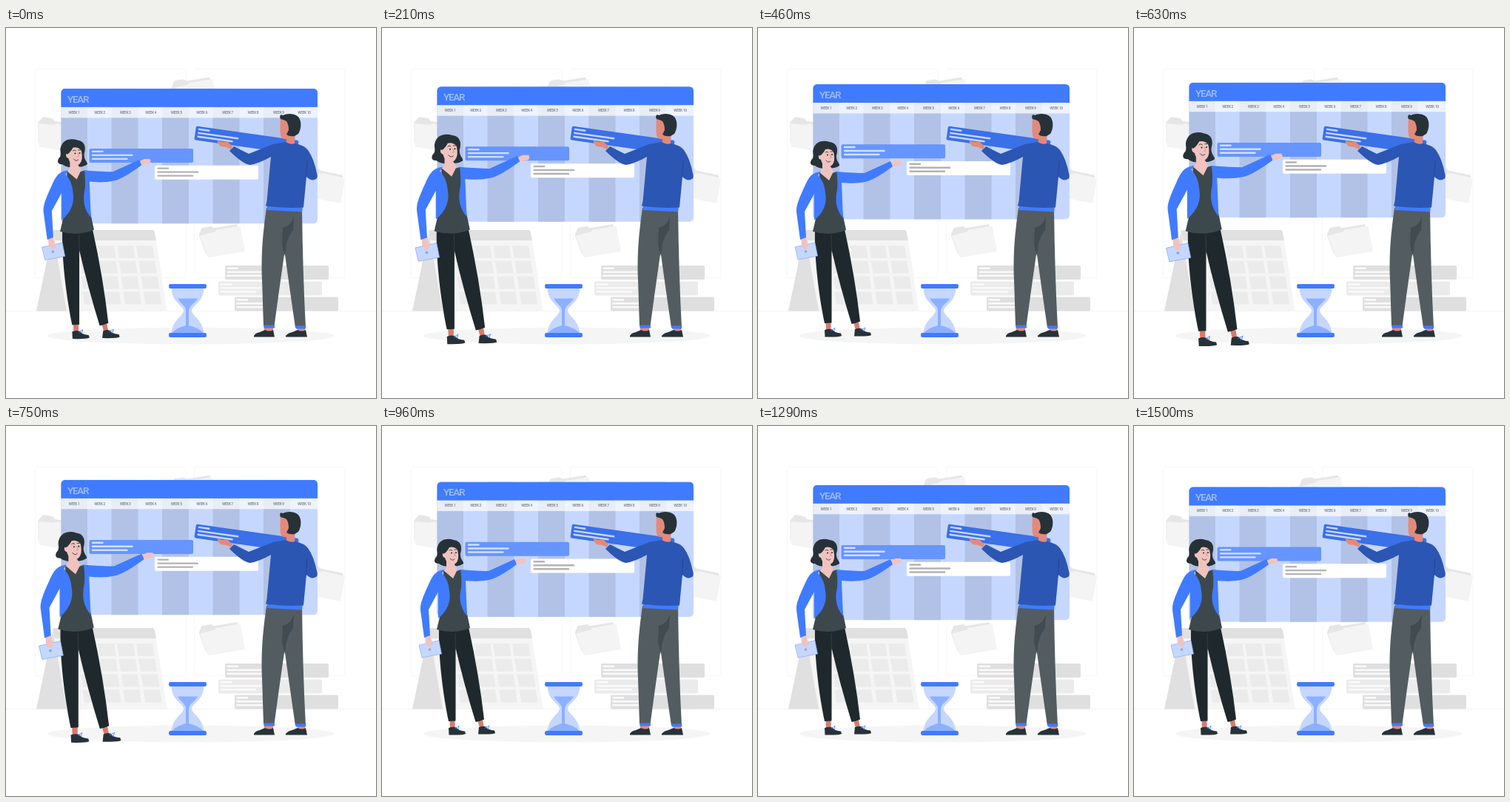
An HTML page that plays this animation: 500x500 px, repeating every 1.54 s.

```html
<!DOCTYPE html>
<html lang="en">
<head>
<meta charset="utf-8">
<title>Yearly planner</title>
<style>
html, body { margin: 0; width: 100%; height: 100%; overflow: hidden; background: #fff; }
svg { display: block; width: 100vw; height: 100vh; }
text { font-family: Roboto, "Liberation Sans", sans-serif; }
.line { fill: none; stroke-linecap: round; stroke-linejoin: round; }
.blue { fill: #407bff; }
.pale { fill: #c6d7ff; }
.dark { fill: #263238; }
.skin { fill: #f0c3bf; }
.tan { fill: #e4897b; }
</style>
</head>
<body>
<svg viewBox="0 0 500 500">
  <defs>
    <g id="folder">
      <path fill="#e6e6e6" d="M0 10 4 3Q5 1 7 1H18L22 4H52Q54 4 54 7V36H5Z"/>
      <path fill="#f4f4f4" d="M1 11 22 9 25 7H55Q57 7 57 9L58 40Q58 42 56 42H9Q7 42 6.500 40Z"/>
    </g>
    <path id="lines" class="line" stroke-width="2.4" d="M4.5 3.8H18M4.5 8.8H58M4.5 13.8H51"/>
    <clipPath id="boardShape"><rect x="74.5" width="346.5" height="182.5" rx="5.5"/></clipPath>
  </defs>

  <g class="line" stroke="#f7f7f7">
    <rect x="39.5" y="55.5" width="203.5" height="282" rx="2"/>
    <rect x="254.5" y="55.5" width="203.5" height="282" rx="2"/>
    <path stroke="#f3f3f3" d="M0 382.5H500"/>
  </g>
  <ellipse cx="249.5" cy="416" rx="194" ry="11.5" fill="#f5f5f5"/>
  <use href="#folder" transform="translate(222 71) rotate(-9)"/>
  <use href="#folder" transform="translate(45 118) rotate(10)"/>
  <use href="#folder" transform="translate(404 184) rotate(12)"/>
  <use href="#folder" transform="translate(259 270) rotate(-9.5)"/>

  <path fill="#e0e0e0" d="M63 277 41 382.5H90Z"/>
  <path fill="#f5f5f5" d="M64 280H202L217.5 382.5H82Z"/>
  <path fill="#e0e0e0" d="M63 275Q63 273 66 273H198Q200 273 200.500 275L203 287H66Z"/>
  <g id="cells" fill="#ebebeb"></g>
  <g id="books"></g>

  <g id="board">
    <g clip-path="url(#boardShape)">
      <rect class="pale" x="74" width="348" height="183"/>
      <g id="weeks"></g>
      <rect class="blue" x="74" width="348" height="25"/>
      <text x="83" y="18.800" font-size="13.5" font-weight="500" letter-spacing="-1.3" fill="#a0bdff">YEAR</text>
    </g>
    <rect x="112.5" y="81.2" width="140.5" height="19" rx="2" fill="#6695ff"/>
    <use href="#lines" x="112.5" y="81.2" stroke="#d1dfff"/>
    <rect x="201" y="104" width="140" height="19" rx="2" fill="#fff"/>
    <use href="#lines" x="201" y="104" stroke="#b3b3b3"/>
  </g>

  <g id="hourglass">
    <path class="pale" d="M223.5 351H267.5C267 371 252 374 251 382 252 390 266 394 267.5 413H223.5C225 394 239 390 240 382 239 374 224 371 223.5 351Z"/>
    <path fill="#8cb0ff" d="M232 365.5H259C256 372 247.5 375 247 382V402Q260 405 267 412H224Q231 405 243 402V382C243 375 235 372 232 365.5Z"/>
    <path class="blue" d="M222 346H269Q271 346 271 349T269 352H222Q220 352 220 349T222 346ZM222 412H269Q271 412 271 415T269 418H222Q220 418 220 415T222 412Z"/>
  </g>

  <g id="man">
    <g transform="translate(257 132.5) rotate(8)">
      <rect width="140" height="19" rx="2" fill="#3a70e8"/>
      <use href="#lines" stroke="#c5d6fa"/>
    </g>
    <path class="tan" d="M348 404H361V411H350ZM393 405H404V411H395Z"/>
    <path class="dark" d="M335 416Q337 412 343 411L350 408Q356 411 361 408L363 417.5H335ZM378 416Q381 412 387 411L394 408Q400 411 405 408L407 417.5H378Z"/>
    <path fill="#535c61" d="M352 243C346 285 345 310 346 340L348 403H362.500Q371 340 376.500 303 383 350 391 405H405Q401 330 400 243Z"/>
    <path fill="#424b50" d="M389 254Q386 267 374 270L373 293 377 308Q378 285 388 273Z"/>
    <path class="blue" d="M348 401.5H363V405.5H349ZM391 402.5H405.5L405 406.5H392ZM353 239 401 241 400 248.500 352.5 246Z"/>
    <path class="tan" d="M304 164 298 161 290 160 286 155 286 152 293 154 299 153 306 160ZM371 122Q370 140 371 145 372 151 379 150V156Q385 159 390 156L391 140 382 120Z"/>
    <path fill="#2c56b3" d="M378 154 361 157 328 170 308 160 302 166Q320 184 330 185 342 183 358 174L352.500 234 351 240.500Q376 244 402 242.500L406 201Q413 208 419 204 422 202 420 196 416 176 408 165 404 159 391 156Q384 158 378 154Z"/>
    <path class="line" stroke="#234792" d="M405.500 201 407 180"/>
    <path class="dark" d="M371 123C369 119 371 116 374 118 380 115 390 115 395 120 400 126 399 137 395 143L390 146Q383 147 379 144L382 138Q382 130 379 126Q376 124 371 123Z"/>
    <ellipse class="tan" cx="378.500" cy="135" rx="2.6" ry="4.2"/>
  </g>

  <g id="woman">
    <path fill="#d9796d" d="M91.5 398H98.5V409H92ZM129 397H136L138 408H132Z"/>
    <path class="dark" d="M90 408Q95 406 99 407 104 412 112 412.5L113 416Q109 418 90.5 417.5ZM131 407Q136 405 139 406 144 411 152 411.5L153 415Q150 417 130 416.5Z"/>
    <path class="line" stroke="#407bff" stroke-width=".8" d="M99 409 104 405 103 410 100 407M139 408 145 405 143 410 140 406"/>
    <path fill="#1f292d" d="M77 273C76 315 83 365 90 399L99.5 398.5 99.500 300Q111 350 126.500 400 132 399 138 396.5 131 335 117 272Z"/>
    <path class="line" stroke="#3a464b" stroke-width=".7" d="M99 280 99.500 302"/>
    <path class="dark" d="M75 163C78 153 88 151 97 154 106 155 109 163 106 172 105 180 111 183 110 186 104 190 99 190 94 188 88 192 79 188 77 186 69 186 70 180 74 176 76 171 73 168 75 163Z"/>
    <path fill="#3d484d" d="M83 195Q95 199 107 194L111 235 119 273Q97 282 74 275L84 232Z"/>
    <path class="skin" d="M87 180V191L83 195 96 206 102 194 98 187Z"/>
    <path class="skin" d="M90 163Q95 163 99 162 104 168 103 179 101 188 94 187.500 87 186 85 178 81 177 82 172L86 171Z"/>
    <path class="dark" d="M83 173Q88 170 91 164 99 162 104 170 105 157 95 156 83 156 82 168Z"/>
    <g class="line" stroke="#263238" stroke-width=".8">
      <path d="M91 168Q93 166 95 168M98 167 101 167"/>
      <path stroke="#d48980" d="M97.5 171 99 175 97 176"/>
      <path d="M92 179Q95 183 98 180"/>
    </g>
    <g class="dark"><circle cx="94" cy="171.5" r="1"/><circle cx="100" cy="171" r="1"/></g>
    <path class="skin" d="M179 182 186 179H193Q195 182 193 185L185 187 179 186ZM58 283 65 282 67 291 68 298 63 300 59 294Z"/>
    <path class="blue" d="M85 194C72 195 68 203 63 214 56 229 51 241 52 249L57 286 65 283 63 248 76 224V260Q95 244 91 223 90 208 81 199ZM106 194Q130 196 144 196L179 180 182 187Q158 205 145 208 131 211 113 209L115 257C107 247 103 236 107 218Q108 205 106 194Z"/>
    <path fill="#c6d7ff" stroke="#88a9ef" stroke-width=".7" stroke-linejoin="round" d="M50 296 77 290 80.5 308 54 313Z"/>
    <path class="skin" d="M59 289 66 287 68 295 66 299 61 298Z"/>
    <circle cx="64.5" cy="302" r="1.8" fill="#88a9ef"/>
  </g>
</svg>
<script>
const LOOP = 1540, LEAD = 41;
const byId = id => document.getElementById(id);
const range = n => [...Array(n).keys()];

byId('cells').innerHTML = range(16).map(i => {
  const row = i >> 2, x = 98 + (i & 3) * (26 + row * .5) + row * 1.8, y = 294 + row * 20.8;
  return `<path d="M${x} ${y}h22l2.6 17h-22Z"/>`;
}).join('');

byId('books').innerHTML = [[296, 321, '#dfdfdf'], [287, 342.5, '#ebebeb'], [309, 363.5, '#dfdfdf']]
  .map(([x, y, fill]) => `<rect x="${x}" y="${y}" width="140" height="19" rx="2" fill="${fill}"/>
    <use href="#lines" x="${x - 1}" y="${y}" stroke="#fafafa"/>`).join('');

byId('weeks').innerHTML =
  range(5).map(i => `<rect x="${74 + i * 68.5}" width="36" height="183" fill="#b2c2e6"/>`).join('') +
  '<rect x="74" y="25" width="348" height="14.5" fill="#fff" opacity=".7"/>' +
  range(10).map(i => `<text x="${92 + i * 34.55}" y="34" font-size="4.9" text-anchor="middle" letter-spacing="-.35" font-weight="500" fill="#7b7f87">WEEK ${i + 1}</text>`).join('');

const clamp = v => Math.min(1, Math.max(0, v));
const ease = p => p * p * (3 - 2 * p);

// One heartbeat: quick swell, slower release.
const beat = (t, start) => ease(clamp((t - start) / 150)) - ease(clamp((t - start - 150) / 285));

function draw(now) {
  const t = (now + LEAD) % LOOP;
  const lift = 9.9 * (1 - Math.abs(1 - 2 * t / LOOP));
  const scale = 1 + .1 * (beat(t, 0) + beat(t, 550));
  byId('board').setAttribute('transform', `translate(0 ${82.4 - lift})`);
  byId('woman').setAttribute('transform', `translate(122 281) scale(${scale}) translate(-122 -281)`);
}

const begin = performance.now();
function tick() {
  draw(performance.now() - begin);
  requestAnimationFrame(tick);
}
tick();
</script>
</body>
</html>
```
